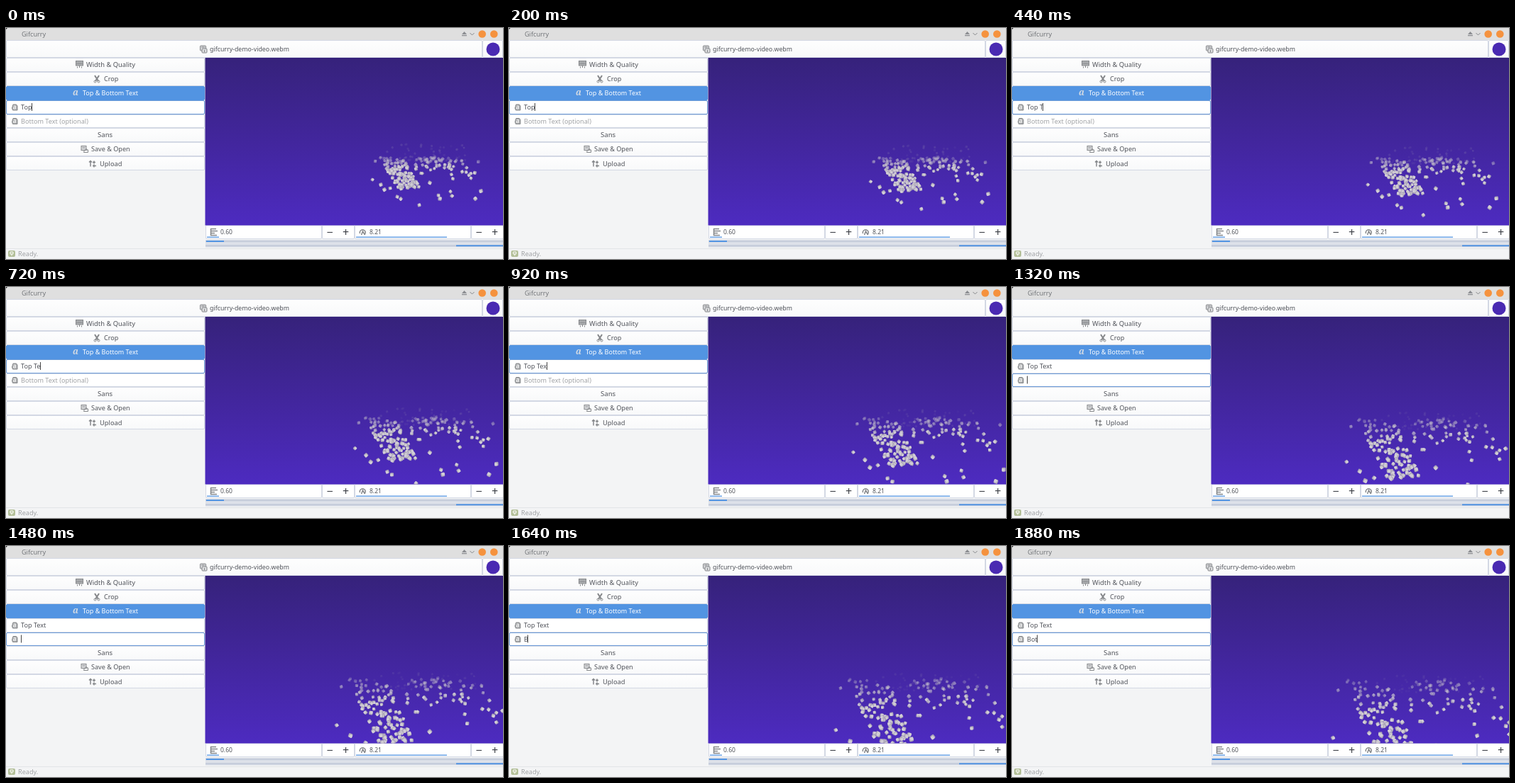
These frames come from a looping animation (700x326 px, 1920 ms). An HTML page:

```html
<!DOCTYPE html>
<html lang="en">
<head>
<meta charset="utf-8">
<style>
  html, body { margin: 0; width: 100%; height: 100%; overflow: hidden; background: #f3f4f5; }
  svg { display: block; width: 700px; height: 326px; }
  text { font: 9.1px "Noto Sans", "Open Sans", sans-serif; fill: #50535a; white-space: pre; }
  .hint { fill: #a0a2a5; }
  .light { fill: #fff; }
  .bold { font-size: 16px; fill: #3b3e45; text-anchor: middle; }
  .line { fill: none; stroke: #85878a; stroke-width: 1; }
  .pale { fill: #dcdddf; }
  .gray { fill: #acaeb0; }
</style>
</head>
<body>
<svg id="stage" viewBox="0 0 700 326">
  <defs>
    <linearGradient id="sky" x2="0" y2="1">
      <stop offset="0" stop-color="#36227b"/>
      <stop offset=".5" stop-color="#42269d"/>
      <stop offset="1" stop-color="#4d2bc0"/>
    </linearGradient>
    <linearGradient id="button" x2="0" y2="1">
      <stop offset="0" stop-color="#fefefe"/>
      <stop offset="1" stop-color="#f8f9fa"/>
    </linearGradient>
    <clipPath id="screen"><rect x="280.500" y="42" width="419.500" height="236.500"/></clipPath>
    <g id="letter">
      <path d="M-2-4h4.500l1.500 2v6h-6.500l-1-3z" class="line gray"/>
      <path d="M-1.500-2h3v4h-3v-2h3" class="line" style="stroke:#eee"/>
    </g>
  </defs>

  <rect width="700" height="326" fill="#f3f4f5"/>
  <rect width="700" height="17" fill="#dfdfdf"/>
  <path d="M0 0h2L0 2z" fill="#222"/>
  <text x="22" y="12" style="fill:#74777b">Gifcurry</text>
  <path d="M642 9l3.500-4 3.500 4zM642 10h7v1.200h-7z" fill="#8a8c90"/>
  <path d="M653.500 7l3 3 3-3" class="line"/>
  <circle cx="670.700" cy="8.500" r="5.300" fill="#f5923e"/>
  <circle cx="687.300" cy="8.500" r="5.300" fill="#f5923e"/>

  <g id="buttons"></g>
  <circle cx="686" cy="30" r="9.500" fill="#4a2ab2"/>

  <g id="icons">
    <g transform="translate(278 30)">
      <rect x="-4.500" y="-5" width="8" height="7" rx="1" class="line pale"/>
      <rect x="-2" y="-1" width="7" height="6" rx="1" class="line pale"/>
      <path d="M-3-3h5M1.500 1v3" class="line"/>
    </g>
    <g transform="translate(103.500 51)">
      <rect x="-5" y="-4.500" width="10" height="6.500" class="line gray"/>
      <path d="M-4-1h8M-3 3.500v2M0 2v3M3 3.500v2" class="line"/>
    </g>
    <g transform="translate(128 72)">
      <path d="M-3-5L2 3M3-5L-2 3" class="line" style="stroke-width:2"/>
      <circle cx="-2.500" cy="3.500" r="1.500" class="line"/>
      <circle cx="2.500" cy="3.500" r="1.500" class="line"/>
    </g>
    <text x="94" y="95" style="font:italic bold 12px 'Noto Serif',serif;fill:#d3dae3">a</text>
    <use href="#letter" x="12" y="112"/>
    <use href="#letter" x="12" y="131.500"/>
    <g transform="translate(110.500 171)">
      <rect x="-4.500" y="-4.500" width="7" height="6" class="line pale"/>
      <path d="M-3-2h4M0 1h5v3.500h-6zM2-1l2 2" class="line"/>
    </g>
    <g transform="translate(122 191.500)">
      <path d="M-3 4v-8m-2 2l2-2 2 2" class="line" style="stroke-width:1.500"/>
      <path d="M0-2h4M2-4v4M0 3h5M2 1v4" class="line" style="stroke-width:1.500"/>
    </g>
    <g transform="translate(293 288)">
      <path d="M-5-4.500h8M-5-1.500h10M-5 1.500h6M-5 4.500h9M-4.500-5v10" class="line" style="stroke-width:1.500"/>
    </g>
    <g transform="translate(502.500 288)">
      <path d="M-4 2a4 4 0 1 1 7 1M-2 4l2-5 3 5" class="line" style="stroke-width:1.500"/>
    </g>
    <g transform="translate(8 318.500)">
      <rect x="-5" y="-4.500" width="10" height="9" rx="2" fill="#b3bf98"/>
      <path d="M-2-2.500h4v3h-4zM0 .500v2.500" stroke="#fff" fill="none"/>
    </g>
  </g>

  <g id="labels"></g>
  <rect id="focus" x=".5" width="279" rx="1.500" fill="none" stroke="#6c9bd8"/>
  <text id="top" x="21" y="115"></text>
  <text id="bottom" x="21" y="134.500"></text>
  <rect id="caret" width="1" height="11" fill="#444"/>

  <rect x="280.500" y="42" width="419.500" height="236.500" fill="url(#sky)"/>
  <g id="cubes" clip-path="url(#screen)"></g>

  <g fill="#5294e2">
    <rect x="283" y="294.500" width="17" height="1.300"/>
    <rect x="493" y="294.500" width="128" height="1.300"/>
  </g>
  <rect x="281" y="299" width="419" height="10.500" fill="#dde1e9"/>
  <path d="M281 301h419M281 307.200h419" stroke="#c6cddb" stroke-width="2.500"/>
  <path d="M282 301h25M634 307.200h66" stroke="#5294e2" stroke-width="2"/>
  <path d="M0 311.500h700" stroke="#e2e4e7"/>
</svg>

<script>
const LOOP = 1920, STEP = 40;
const $ = id => document.getElementById(id);

function add(parent, tag, attrs, content) {
  const node = document.createElementNS("http://www.w3.org/2000/svg", tag);
  for (const key in attrs) node.setAttribute(key, attrs[key]);
  if (content) node.textContent = content;
  parent.appendChild(node);
  return node;
}

function button(x, y, width, height, fill = "url(#button)", stroke = "#d3d8e4") {
  add($("buttons"), "rect", { x: x + .5, y: y + .5, width: width - 1, height: height - 1, rx: 1.5, fill, stroke });
}

function label(x, y, content, size = 9.1, name = "") {
  add($("labels"), "text", { x, y, class: name, style: `font-size:${size}px` }, content);
}

button(0, 17, 671, 25);
button(671, 17, 29, 25);
[42, 62, 141, 161, 181].forEach(y => button(0, y, 280, 20));
button(0, 82, 280, 20, "#5294e2", "#5294e2");
button(0, 102, 280, 20, "#fff");
button(0, 122, 280, 19, "#fff");
for (const x of [281, 491]) {
  button(x, 278, 164, 20, "#fff");
  button(x + 164, 278, 46, 20, "#fff");
  label(x + 175, 293.5, "−", 16, "bold");
  label(x + 197.5, 293.5, "+", 16, "bold");
}

label(287, 33, "gifcurry-demo-video.webm", 8.8);
label(113, 54.5, "Width & Quality", 9.35);
label(138, 75, "Crop");
label(108, 95, "Top & Bottom Text", 9, "light");
label(129, 154, "Sans", 9.6);
label(120, 174.3, "Save & Open");
label(132, 194.7, "Upload", 9.3);
label(302, 291, "0.60", 8.5);
label(512, 291, "8.21", 8.5);
label(17, 322, "Ready.", 9.1, "hint");

let seed = 29;
function random() {
  seed = (seed * 1664525 + 1013904223) % 4294967296;
  return seed / 4294967296;
}
const between = (low, high) => low + (high - low) * random();
const clamp = (value, low, high) => Math.min(high, Math.max(low, value));
const repeat = (count, action) => { for (let i = 0; i < count; i++) action(); };

// Cubes scatter away from a point on the floor while the camera closes in.
const CENTER = 597, HORIZON = 178;
const cubes = [];

function cube(x, y, dust = false) {
  const node = add($("cubes"), "g", {});
  add(node, "rect", { x: -.5, y: -.5, width: 1, height: 1, rx: .25, fill: dust ? "#7563a8" : "#aca6b8" });
  add(node, "rect", { x: -.5, y: -.5, width: .74, height: .74, rx: .2, fill: dust ? "#877bb2" : "#d2ced6" });
  const alpha = dust ? between(.08, .32) : clamp((y - 174) / 24 + between(-.15, .1), .25, 1);
  cubes.push({ node, x, y, dust, alpha, angle: between(0, 360), spin: between(-70, 70), size: between(.85, 1.1) });
}

// The main swarm leans to the right towards the viewer.
repeat(98, () => {
  const y = 182 + 46 * random();
  cube(526 + .6 * (y - 182) + 32 * random() ** 1.2, y);
});
repeat(45, () => cube(between(578, 628), 182 + 17 * random() ** 1.3));
repeat(22, () => cube(between(550, 600), between(188, 226)));
repeat(18, () => cube(between(626, 668), between(187, 216)));
repeat(45, () => cube(between(535, 650), between(164, 188), true));
[
  [516, 214], [582, 250], [551, 238], [533, 228], [541, 226], [528, 221], [611, 241],
  [628, 237], [626, 231], [661, 241], [669, 230], [556, 241], [609, 236], [520, 188]
].forEach(([x, y]) => cube(x, y));
cubes.sort((a, b) => a.y - b.y);
cubes.forEach(c => $("cubes").appendChild(c.node));

function drawCubes(t) {
  const rise = 1 + .33 * t + .27 * t * t;
  for (const c of cubes) {
    const x = CENTER + (c.x - CENTER) * (1 + (c.dust ? .2 : .42) * t);
    const y = c.dust ? c.y + 10 * t : HORIZON + (c.y - HORIZON) * rise;
    const size = c.size * (c.dust ? 3 : 3.9 + clamp(y - HORIZON, 0, 110) * .018);
    const alpha = c.dust ? c.alpha * (1 - .25 * t) : c.alpha;
    c.node.setAttribute("transform", `translate(${x} ${y}) rotate(${c.angle + c.spin * t}) scale(${size})`);
    c.node.setAttribute("opacity", alpha);
  }
}

const typed = (text, times, ms) => text.slice(0, times.filter(at => ms >= at).length);

function drawFields(ms) {
  const onBottom = ms >= 1200;
  const top = $("top"), bottom = $("bottom");
  top.textContent = typed("Top Text", [0, 0, 0, 240, 400, 640, 840, 1000], ms);
  bottom.textContent = onBottom ? typed("Bot", [1520, 1720, 1840], ms) : "Bottom Text (optional)";
  bottom.setAttribute("class", onBottom ? "" : "hint");
  const field = onBottom ? bottom : top;
  const width = field.textContent ? field.getComputedTextLength() : 0;
  $("caret").setAttribute("x", 21 + Math.floor(width));
  $("caret").setAttribute("y", onBottom ? 125.5 : 106);
  $("focus").setAttribute("y", onBottom ? 122.5 : 102.5);
  $("focus").setAttribute("height", onBottom ? 18 : 19);
}

const start = performance.now();
function draw() {
  const elapsed = Math.max(0, performance.now() - start) % LOOP;
  const ms = Math.floor(elapsed / STEP) * STEP;
  drawCubes(ms / 1000);
  drawFields(ms);
  requestAnimationFrame(draw);
}
draw();
</script>
</body>
</html>
```
